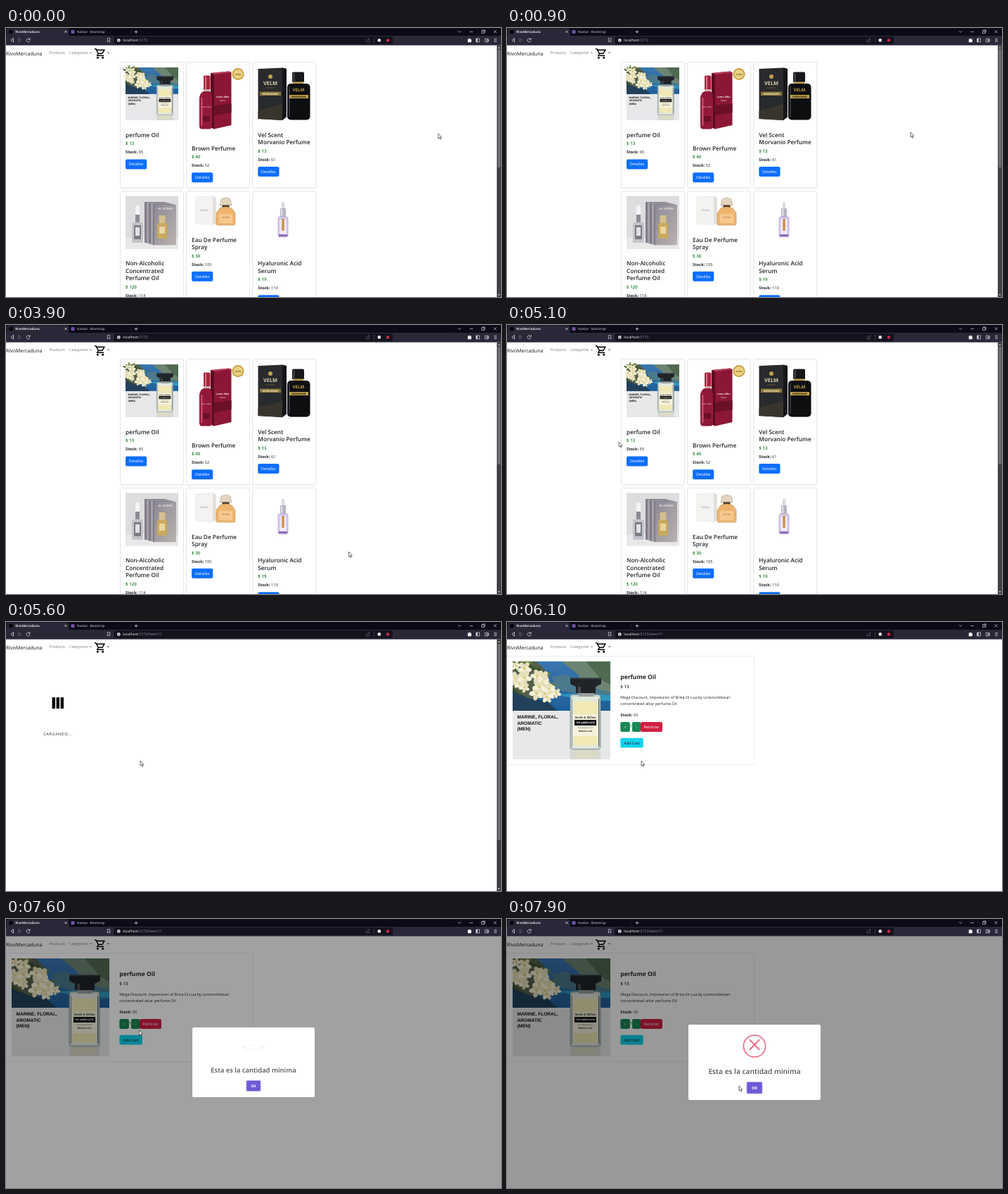
Write an HTML page that moves like this. It is 704 px wide and 382 px high and loops after 8000 ms.

```html
<!DOCTYPE html>
<html lang="es">
<head>
<meta charset="utf-8">
<title>Shop demo</title>
<style>
html, body { margin: 0; width: 100%; height: 100%; overflow: hidden; background: #fff; }
svg { display: block; width: 704px; height: 382px; font-family: "Open Sans", "Noto Sans", sans-serif; text-rendering: geometricPrecision; }
text { white-space: pre; }
</style>
</head>
<body>
<svg id="stage" viewBox="0 0 704 382" xmlns="http://www.w3.org/2000/svg"></svg>
<script>
const LOOP = 8000, STEP = 100;
const stage = document.getElementById('stage');

// Markup helpers
const rect = (x, y, w, h, fill, more = '') => `<rect x="${x}" y="${y}" width="${w}" height="${h}" fill="${fill}" ${more}/>`;
const circle = (x, y, r, fill, more = '') => `<circle cx="${x}" cy="${y}" r="${r}" fill="${fill}" ${more}/>`;
const shape = (d, fill, more = '') => `<path d="${d}" fill="${fill}" ${more}/>`;
const line = (d, color, w = 0.8, more = '') => `<path d="${d}" fill="none" stroke="${color}" stroke-width="${w}" ${more}/>`;
const text = (x, y, size, fill, s, more = '') => `<text x="${x}" y="${y}" font-size="${size}" fill="${fill}" ${more}>${s}</text>`;
const gradient = (id, a, b, more) => `<linearGradient id="${id}" ${more}><stop offset="0" stop-color="${a}"/><stop offset="1" stop-color="${b}"/></linearGradient>`;
const mid = 'text-anchor="middle"';
const bold = 'font-weight="700"';
const ink = '#212529';

function random(seed) {
  return () => (seed = (seed * 16807) % 2147483647) / 2147483647;
}

function button(x, y, w, fill, label, id = '', color = '#fff') {
  return rect(x, y, w, 13.9, fill, `rx="2.2" id="${id}"`) +
    text(x + w / 2, y + 8.9, 5.5, color, label, mid);
}

const stock = (x, y, n) =>
  `<text x="${x}" y="${y}" font-size="5.7" fill="${ink}"><tspan font-weight="700">Stock:</tspan> ${n}</text>`;

// Product pictures
function flower(x, y, r, turn) {
  let s = '';
  for (let i = 0; i < 5; i++)
    s += `<ellipse cy="${-r * 0.6}" rx="${r * 0.38}" ry="${r * 0.6}" fill="${i % 2 ? '#f6f1d8' : '#e6dfba'}" transform="rotate(${turn + i * 72})"/>`;
  return `<g transform="translate(${x} ${y})">${s}${circle(0, 0, r * 0.2, '#d9bf5c')}</g>`;
}

function marinePhoto() {
  const rnd = random(77);
  let s = rect(0, 0, 139, 139, '#e7e8ea') + rect(0, 0, 139, 70, 'url(#sea)') +
    shape('M70 0H139V44L122 40 104 34 92 18Z', '#6d8472') +
    shape('M104 0H139V33L126 26 116 14Z', '#4f6a50') +
    shape('M56 22L76 18 96 32 116 40 139 43V48L96 46 60 40Z', '#4b7a8c') +
    shape('M62 47L96 45 139 48V56L100 55Z', '#2f97bd') +
    shape('M0 0H34L46 12 52 30 40 48 30 62 0 68Z', '#53614a') +
    shape('M0 40L22 52 48 56 64 70H0Z', '#22405a');
  for (let i = 0; i < 14; i++)
    s += `<ellipse rx="8" ry="2" fill="${i % 2 ? '#6b7f3e' : '#3c5230'}" transform="translate(${Math.round(rnd() * 56)} ${Math.round(rnd() * 62)}) rotate(${Math.round(rnd() * 180)})"/>`;
  for (let i = 0; i < 22; i++) {
    const u = rnd(), v = rnd();
    s += flower(Math.round(3 + u * 62), Math.round(4 + u * 24 + v * 30), 6 + 3 * rnd(), Math.round(rnd() * 72));
  }
  s += rect(82, 47, 43, 78, '#c9d2cf', 'rx="3.5" stroke="#6f7b78" stroke-width=".8"') +
    rect(84, 50, 39, 73, '#e3e9dc', 'rx="3"') + rect(87, 57, 33, 62, '#f0e9b4', 'rx="2"') +
    line('M84.5 53V121', '#7f8c88', 0.9) + line('M122.6 53V121', '#566260', 1.2) +
    shape('M82 23H126V32L118 36V45H90V36L82 32Z', '#202429') + rect(82, 23, 44, 2, '#3b4148') +
    rect(93, 36, 4, 9, '#454b52') + rect(94, 45, 21, 5, '#9a9f9f') +
    rect(86, 75, 35, 31, '#f5f1dc') +
    text(103.5, 81, 4.3, '#222', 'Reeds &amp; Willow', mid + ' font-style="italic" font-weight="600"') +
    rect(88, 83, 31, 8, '#111') +
    text(103.5, 88.3, 3.2, '#fff', 'THE AMBER GATE', mid + ' ' + bold) +
    text(103.5, 95, 2.5, '#333', 'The impression of', mid) +
    text(103.5, 99.5, 3, '#222', 'BRISA DI LUA', mid + ' ' + bold) +
    rect(82, 126, 43, 13, '#cdcfca', 'opacity=".6"') + rect(87, 127, 33, 10, '#dedcbb', 'opacity=".6"');
  ['MARINE, FLORAL,', 'AROMATIC', '(MEN)'].forEach((w, i) => {
    s += text(6.5, 81 + i * 8.7, 6.6, '#111', w, bold + ' style="font-family:\'Liberation Sans\',sans-serif"');
  });
  return s;
}

function redPhoto() {
  return shape('M291 64L317 61.5 320.5 63V138L296 143.5 291 141Z', '#8c1734') +
    shape('M291 64L317 61.5 320.5 63 296 66Z', '#b8405a') + shape('M291 64L296 66V143.5L291 141Z', '#5c0c20') +
    shape('M296 110L320.5 107V120L296 124Z', '#6a1126') +
    text(308, 99, 3.6, '#f4dfe2', 'Loma Alba', mid + ' ' + bold) +
    text(308, 104, 3.4, '#f4dfe2', 'Spice', mid) +
    rect(281, 67.5, 9.5, 21, '#a9243f', 'rx="1.5"') + rect(283, 69, 2, 18, '#d77186') +
    rect(281.5, 87, 8.5, 3, '#c8b0a8') +
    shape('M281 90H290Q292.5 93 293 99V139Q293 143.5 289 143.5H279Q275 143.5 275 139V99Q276 92 281 90Z', '#92183a') +
    rect(277, 99, 2.6, 40, '#be4a66', 'rx="1.3"') +
    text(284.5, 113, 2.9, '#f4dfe2', 'Loma Alba', mid) + rect(280, 125, 10, 8, '#6b1023') +
    circle(330, 65.5, 8.5, '#c89d3c') + circle(330, 65.5, 6.8, '#e9d083') +
    text(330, 66.7, 3, '#80601c', 'LONG', mid + ' ' + bold);
}

function blackPhoto() {
  const gold = '#c0a04a';
  return shape('M358.5 58L393 56.5 399 58V126L393 131 358.5 129Z', '#292a2d') +
    shape('M393 56.5L399 58V126L393 131Z', '#141518') +
    circle(376, 69, 3, gold) +
    text(376, 81, 7.4, '#d8cfb0', 'VELM', mid + ' ' + bold) +
    text(376, 86, 2.8, gold, 'S C E N T', mid) +
    rect(361, 90.5, 30, 5.5, '#8d753a') + text(376, 94.8, 4, '#f2e7c4', 'MORVANIO', mid + ' ' + bold) +
    shape('M358.5 118L393 108V131L358.5 129Z', '#38352c') +
    rect(407, 62.5, 17, 15, '#17181b', 'rx="2"') + rect(408.5, 64, 2, 12, '#4a4a4e') +
    rect(408, 76.5, 15, 2.6, gold) +
    rect(400, 79, 32.5, 51.5, '#0d0e10', 'rx="5"') + rect(402, 83, 1.6, 43, '#3d3e42') +
    text(416, 90, 6.2, gold, 'VELM', mid + ' ' + bold) +
    rect(403, 95, 27, 5, gold) + text(416.5, 99, 3.6, '#1c1a12', 'MORVANIO', mid + ' ' + bold);
}

function silverPhoto() {
  let s = rect(170, 238.5, 75, 75, '#dddcde') + rect(170, 298, 75, 15.5, '#e9e8e9');
  for (let i = 0; i < 5; i++)
    s += rect(197 + i * 3, 247 + i * 0.8, 30, 58, i % 2 ? '#a5a1a8' : '#807c88');
  return s + rect(211, 251, 31, 57, 'url(#steel)') +
    text(226.5, 258, 4.3, '#f3eee2', 'AL-SORIM', mid + ' font-weight="600"') +
    rect(217.5, 266, 9, 11, '#d4c08c', 'rx="1"') + rect(215, 277, 14, 22, '#c9a95c', 'rx="2"') +
    rect(218, 282, 8, 10, '#e8d6a0') +
    rect(184, 252, 6, 15, '#f4f4f6', 'rx="2"') + rect(184, 265, 6, 11, '#8b8d95') +
    rect(179, 276, 16, 29, '#c4c5ca', 'rx="2"') + rect(182, 280, 10, 20, '#7b7e87') +
    rect(184, 283, 6, 12, '#e2e2e5');
}

function amberPhoto() {
  return shape('M270 240L294 238.5 298.5 241V277L294 279.5 270 278Z', '#f4f3f1', 'stroke="#dedcd8" stroke-width=".5"') +
    shape('M294 238.5L298.5 241V277L294 279.5Z', '#e2dfda') +
    text(282, 260, 3.2, '#888', 'SELENA', mid) +
    shape('M306 243L312.5 241 319 243 321 252H304Z', '#e3d5c0', 'stroke="#a48f74" stroke-width=".5"') +
    rect(307.5, 251.5, 10, 4, '#4d3a2b') +
    shape('M304 256Q312.5 252 321 256L326 263V278Q326 280 324 280H301Q299 280 299 278V263Z', '#efb56f', 'stroke="#b98a52" stroke-width=".6"') +
    shape('M303 264H322V277H303Z', '#f6c88d') + text(312.5, 270, 3, '#8a5b27', 'SELENA', mid);
}

function serumPhoto() {
  return rect(391.7, 247, 4.6, 10, '#dedae4', 'rx="2"') + rect(390, 256, 8, 12, '#b9b4c2', 'rx="1"') +
    rect(391.5, 257, 1.6, 10, '#f0eef4') +
    rect(387, 268, 14, 29, '#d8c9ee', 'rx="2.5" stroke="#a792c6" stroke-width=".6"') +
    rect(389.5, 272, 9, 21, '#f0eaf8') + rect(392.3, 271, 3.4, 17, '#c99146', 'rx="1"') +
    rect(388, 293, 12, 3, '#8d6fba');
}

// One shop card; y is the middle of the first title line
function card(x, top, picture, y, title, price, count, id) {
  let s = rect(x, top, 90, 178.5, '#fff', 'rx="2.5" stroke="#d9dbdd" stroke-width=".7" filter="url(#soft)"') + picture;
  const left = x + 7.5;
  title.forEach((w, i) => s += text(left, y + 3 + i * 10.5, 8.25, ink, w, 'font-weight="600"'));
  const end = y + (title.length - 1) * 10.5;
  return s + text(left, end + 14.7, 6.2, '#127a1c', '$ ' + price, 'font-weight="600"') +
    stock(left, end + 26.5, count) +
    button(left, end + 34.8, 30.2, '#0d6efd', 'Detalles', id);
}

function shop() {
  const small = `<g transform="translate(170 56) scale(${75 / 139})">${marinePhoto()}</g>`;
  return card(162.5, 48.5, small, 151.7, ['perfume Oil'], 13, 65, 'details') +
    card(256.6, 48.5, redPhoto(), 170.5, ['Brown Perfume'], 40, 52) +
    card(350.8, 48.5, blackPhoto(), 151.7, ['Vel Scent', 'Morvanio Perfume'], 13, 61) +
    card(162.5, 231.5, silverPhoto(), 334, ['Non-Alcoholic', 'Concentrated', 'Perfume Oil'], 120, 114) +
    card(256.6, 231.5, amberPhoto(), 300.5, ['Eau De Perfume', 'Spray'], 30, 105) +
    card(350.8, 231.5, serumPhoto(), 334, ['Hyaluronic Acid', 'Serum'], 19, 110);
}

function detail() {
  return rect(-0.5, 48.5, 352, 154, '#fff', 'stroke="#e2e7e9" stroke-width=".7"') +
    `<svg x="8" y="56" width="139" height="139">${marinePhoto()}</svg>` +
    text(161.3, 81, 8.5, ink, 'perfume Oil', bold) +
    text(161.3, 94, 6.2, ink, '$ 13', 'font-weight="600"') +
    text(161.3, 109, 5.55, ink, 'Mega Discount, Impression of Brisa Di Lua by LorenzoVestari') +
    text(161.3, 117.6, 5.55, ink, 'concentrated attar perfume Oil') +
    stock(161.3, 134, 65) + text(176.6, 150, 5.5, ink, '1', mid) +
    button(161.3, 142, 13.6, '#198754', '+') +
    button(178, 142, 12.2, '#198754', '-', 'minus') +
    button(190, 142, 31, '#d01f40', 'Reiniciar') +
    button(161.3, 164.7, 32.5, '#12d3ee', 'Add Cart', '', '#111');
}

function chrome() {
  const pale = '#d9d9e2', dim = '#6b6a7a';
  return rect(0, 0, 704, 11, '#0b0a17') + rect(0, 11, 704, 13.6, '#292839') +
    shape('M1 11V3Q1 0.5 3 0.5H87Q89.5 0.5 89.5 3V11Z', '#292839') +
    circle(7, 5.4, 3, '#050508') + text(13.2, 7.2, 4.6, '#fff', 'RivoMercaduna', 'font-weight="600"') +
    line('M83.6 4L86.4 6.8M86.4 4L83.6 6.8', '#fff', 0.7) +
    rect(92.5, 3, 5, 5, '#6f51a3', 'rx="1"') + text(101, 7.2, 4.5, pale, 'Navbar · Bootstrap') +
    line('M177.5 3V8', '#3b3a4a', 0.5) + line('M182.7 5.5H187.3M185 3.2V7.8', pale) +
    line('M643 4.3L645 6.3 647 4.3M659.5 5.5H664M676.5 4H680V7.5H676.5ZM677.7 4V2.9H681.1V6.3H680M693.6 3.3L697.6 7.3M697.6 3.3L693.6 7.3', pale, 0.7) +
    line('M10.5 14.5L7 17.3 10.5 20.1Z', pale) + line('M18 14.5L21.5 17.3 18 20.1Z', dim) +
    line('M33.6 15.9A2.5 2.5 0 1 0 34 18.1M34.2 14.3V16.4H32', pale) +
    line('M144.3 14.7H147.7V19.8L146 18.4 144.3 19.8Z', pale, 0.7) +
    rect(153.5, 12.3, 396.5, 10.6, '#13121d', 'rx="2"') +
    circle(160.3, 17.5, 2.4, pale) + line('M160.3 17V19M160.3 15.7V16.3', '#13121d', 0.7) +
    `<text x="166.3" y="19.3" font-size="5.2" fill="#fff">localhost<tspan fill="#9594a3">:5173<tspan id="path"></tspan></tspan></text>` +
    line('M512.3 16.5V19.7H516.5V18M513.8 17.8Q514 15.6 517 15.6M515.7 14.3L517.1 15.6 515.7 17', dim, 0.7) +
    line('M523.4 13.5V21.3', dim, 0.5) + circle(530.8, 17.4, 2.4, '#ececf1') + circle(543, 17.4, 2.2, '#d6294b') +
    shape('M656.8 15.5H658.2A1.1 1.1 0 0 1 660.3 15.5H661.5V17A1.1 1.1 0 0 1 661.5 19.1V20.2H656.8Z', '#fff') +
    line('M668.7 15H673.5V19.8H668.7Z', pale, 0.7) + rect(668.7, 15, 1.9, 4.8, pale) +
    line('M681.2 15.2H685.8V19.8H681.2ZM683.6 16.8H686.5V18.3H683.6Z', pale, 0.7) +
    line('M694 15.4H698M694 17.4H698M694 19.4H698', pale, 0.7);
}

function navbar() {
  const grey = '#7c7d7f';
  const caret = (x, fill) => shape(`M${x} 34.6h3.2l-1.6 1.7z`, fill);
  return text(0, 39.3, 7.1, '#16181b', 'RivoMercaduna', 'font-weight="500"') +
    text(61.5, 37, 5.45, grey, 'Products') + text(90, 37, 5.45, grey, 'Categories') +
    caret(119, grey) + caret(144, '#444') +
    `<g transform="translate(125.2 27.5) scale(.733)">` +
    line('M1 3H3.7L8.3 12H16L20 5H4.6M8.3 12L6.2 16H19', '#000', 2) +
    circle(7, 20, 2, '#000') + circle(17, 20, 2, '#000') + '</g>';
}

const loader = () =>
  [0, 1, 2].map(i => rect(65.6 + i * 6, 107, 4.4, 16, '#000', `id="bar${i}"`)).join('') +
  text(53.2, 160.6, 5.5, '#222', 'CARGANDO...', 'letter-spacing=".6"');

const scrollbar = () => rect(698, 24.6, 6, 357.4, '#414143') +
  rect(698.8, 31, 4.4, 167, '#6d6d70', 'id="thumb"') +
  shape('M699.5 29L701 27 702.5 29ZM699.5 378L701 380 702.5 378Z', '#ddd');

const modal = () => rect(258, 150, 188, 107, '#fff', 'rx="2"') +
  `<g id="ring">${circle(352, 180.5, 15.6, 'none', 'stroke="#e4637c" stroke-width="1.5"')}</g>` +
  `<g id="mark">${line('M-6.5 -6.5L6.5 6.5M6.5 -6.5L-6.5 6.5', '#e4637c', 1.9)}</g>` +
  text(352, 219.7, 10.2, '#545454', 'Esta es la cantidad minima', mid + ' font-weight="600"') +
  rect(340.5, 231, 23, 17.4, '#b8aeee', 'rx="2.2"') + rect(341.5, 232, 21, 15.4, '#6e58d6', 'rx="1.5"') +
  text(352, 241.9, 5.6, '#fff', 'OK', mid + ' ' + bold);

stage.innerHTML = '<defs>' +
  gradient('sea', '#3a76b0', '#1f5f9a', 'x1="0" y1="0" x2="0" y2="1"') +
  gradient('steel', '#8d8997', '#b9b2ae', 'x1="0" y1="0" x2="1" y2="1"') +
  `<filter id="soft" x="-5%" y="-5%" width="110%" height="110%"><feDropShadow dx="0" dy=".5" stdDeviation=".7" flood-opacity=".1"/></filter>
  </defs>` + rect(0, 0, 704, 382, '#fff') + navbar() +
  `<g id="shop">${shop()}</g><g id="loader">${loader()}</g><g id="detail">${detail()}</g><g id="scroll">${scrollbar()}</g>` +
  rect(0, 24.5, 704, 358, '#000', 'id="shade"') + chrome() + `<g id="modal">${modal()}</g>` +
  `<g id="arrow">${shape('M0 0V7L1.7 5.6 2.8 8.1 3.9 7.6 2.8 5.2H4.9Z', '#fff', 'stroke="#111" stroke-width=".6"')}</g>` +
  `<g id="hand">${shape('M-.8 .6Q0 -.5 .8 .6V3L3.6 3.7Q4.4 4 4.2 5L3.6 8H-.8L-2.8 4.9Q-2.6 3.9 -.8 5Z', '#fff', 'stroke="#111" stroke-width=".6"')}</g>`;

const el = id => document.getElementById(id);
const set = (id, name, v) => el(id).setAttribute(name, v);
const show = (id, on) => set(id, 'display', on ? 'inline' : 'none');

// [time, x, y] of the pointer tip
const route = [
  [0, 614.8, 150], [100, 614.8, 150], [900, 574, 148], [1600, 466, 82], [2100, 466, 82],
  [2500, 300, 188], [2900, 209, 122], [3100, 209, 122], [3300, 212.5, 138.5],
  [3400, 212.5, 138.5], [3500, 507, 256], [3600, 507, 256], [3900, 487.6, 322], [4100, 458, 321],
  [4500, 178, 187], [4900, 127, 135], [5300, 191, 197], [6300, 191, 197.4], [6600, 262, 211],
  [6900, 205, 170], [7100, 189.6, 154.5], [7500, 189.6, 154.5], [7600, 189.4, 158], [7900, 330, 237]
];
const zoom = [[7600, 0.925], [7700, 1.035], [7800, 0.96], [7900, 1]];
const flip = [[7600, 0.18], [7700, 0.55], [7800, 0.87], [7900, 1]];

function at(keys, t) {
  const i = keys.findIndex(k => k[0] >= t);
  if (i < 0) return keys[keys.length - 1].slice(1);
  if (i === 0) return keys[0].slice(1);
  const a = keys[i - 1], b = keys[i], u = (t - a[0]) / (b[0] - a[0]);
  return a.slice(1).map((v, n) => v + (b[n + 1] - v) * u);
}

function draw(ms) {
  const t = Math.floor((ms % LOOP) / STEP) * STEP;
  const home = t < 5500, loading = !home && t < 6100, asking = t >= 7600;
  show('shop', home);
  show('loader', loading);
  show('detail', !home && !loading);
  show('scroll', home || loading);
  set('thumb', 'height', home ? 167 : 279);
  el('path').textContent = home ? '' : '/item/11';

  for (let i = 0; i < 3; i++) {
    const h = 16 + 3 * Math.sin((t - 5600) / 130 - i * 0.9) * (t > 5600);
    set('bar' + i, 'height', h);
    set('bar' + i, 'y', 115 - h / 2);
  }

  // The pointer is out of sight for one step before it crosses the cards
  const [x, y] = at(route, t), hidden = t === 2100;
  const onDetails = home && x >= 170 && x <= 200 && y >= 186.7 && y <= 200;
  const onMinus = t >= 7100 && !asking;
  set('details', 'fill', onDetails ? '#0b5ed7' : '#0d6efd');
  set('minus', 'fill', onMinus ? '#116a40' : '#198754');
  for (const id of ['arrow', 'hand']) set(id, 'transform', `translate(${x} ${y})`);
  show('hand', onDetails || onMinus);
  show('arrow', !hidden && !onDetails && !onMinus);

  show('shade', asking);
  show('modal', asking);
  if (!asking) return;
  const [k] = at(zoom, t), [f] = at(flip, t);
  const pop = Math.max(0, (t - 7700) / 200);
  set('shade', 'opacity', t === 7600 ? 0.37 : 0.4);
  set('modal', 'transform', `translate(352 203.5) scale(${k}) translate(-352 -203.5)`);
  set('ring', 'transform', `translate(0 180.5) scale(1 ${f}) translate(0 -180.5)`);
  set('ring', 'opacity', Math.min(1, 0.1 + f));
  set('mark', 'transform', `translate(352 ${180.5 - 2 * pop}) scale(${0.4 + 0.7 * pop})`);
  set('mark', 'opacity', 0.9 * pop);
}

function tick(now) {
  draw(now);
  requestAnimationFrame(tick);
}
draw(0);
requestAnimationFrame(tick);
</script>
</body>
</html>
```
